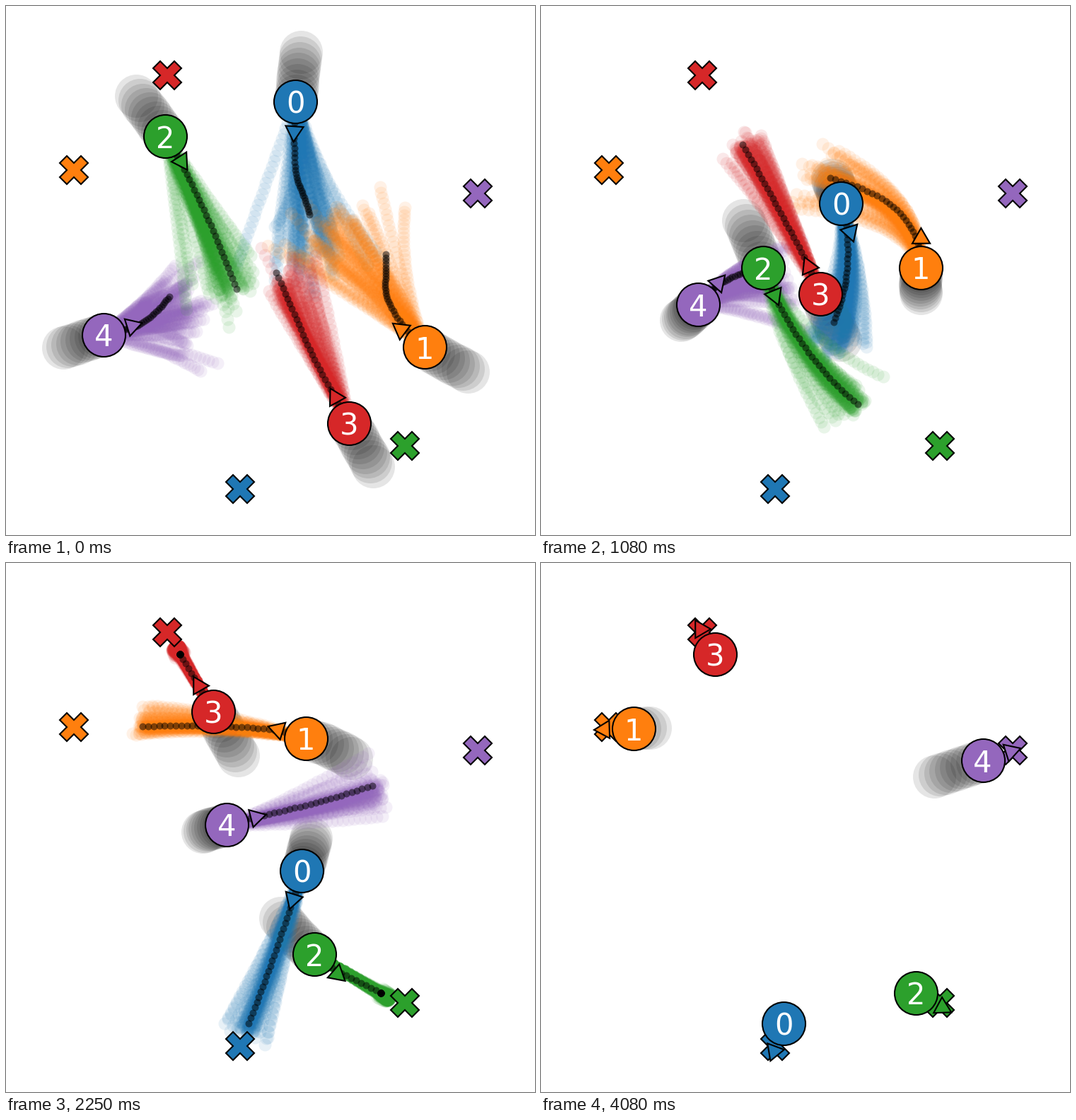
Animation of 748 by 748 pixels, one loop 4.12 s. Source, as a matplotlib script:

```python
import numpy as np
import matplotlib.pyplot as plt
from matplotlib.animation import FuncAnimation

SIZE, DPI = 748, 88
LOOP, TICK, STEPS = 4120, 20, 99
HORIZON, TRAIL, SAMPLES = 30, 9, 32
PX = 72 / DPI  # points per pixel
EDGE = 2.08

KEYS = [-9, 0, 14, 26, 30, 44, 56, 74]  # steps of the waypoints


class Path:
    """Hermite curve through waypoints that halts at the last one."""

    def __init__(self, points, arrival):
        self.t = np.array(KEYS[:len(points) - 1] + [arrival], float)
        self.p = np.array(points, float)
        self.v = np.gradient(self.p, self.t, axis=0)

    def __call__(self, step):
        s = np.clip(np.atleast_1d(step).astype(float), self.t[0], self.t[-1])
        i = np.clip(np.searchsorted(self.t, s) - 1, 0, len(self.t) - 2)
        h = (self.t[i + 1] - self.t[i])[:, None]
        u = (s - self.t[i])[:, None] / h
        a, b = self.p[i], self.p[i + 1]
        va, vb = self.v[i] * h, self.v[i + 1] * h
        return ((2 * u**3 - 3 * u**2 + 1) * a + (u**3 - 2 * u**2 + u) * va
                + (3 * u**2 - 2 * u**3) * b + (u**3 - u**2) * vb)

    def heading(self, step):
        s = min(step, self.t[-1] - 0.5)
        before, after = self([s - 0.4, s + 0.4])
        return (after - before) / np.hypot(*(after - before))


class Fan:
    """Sampled plans scattered around the real one, narrowing on arrival."""

    def __init__(self, path, offset, decay, spread, seed):
        rng = np.random.default_rng(seed)
        self.path, self.offset = path, np.array(offset)
        self.decay, self.spread = decay, spread
        self.phase = rng.uniform(0, 2 * np.pi, (3, SAMPLES, 3))
        self.freq = rng.uniform(0.04, 0.2, (3, SAMPLES, 3))

    def noise(self, step):
        """Slowly drifting, roughly normal values: three per sample."""
        z = np.sin(self.freq * step + self.phase).sum(-1) * (2 / 3) ** 0.5
        return (z * (0.75 + 0.15 * z**2))[..., None]

    def __call__(self, step):
        start, middle, goal = self.path(step + np.array([0, 0.5, 1]) * HORIZON)
        left = max(0, 1 - step / self.path.t[-1])
        spread = self.spread * left**1.4
        end = goal + self.offset * np.exp(-step / self.decay) * min(1, 2 * left)
        bulge = (2 * middle - start - goal) * (1 - np.exp(-step / 10))
        d = (end - start) / (np.hypot(*(end - start)) + 1e-6)
        n = np.array([-d[1], d[0]])
        side, along, mid = self.noise(step)
        ends = end + spread * (side * n + 0.5 * along * d)
        ctrl = (start + end) / 2 + bulge + n * spread * (0.4 * side + 0.25 * mid)
        u = np.linspace(0, 1, HORIZON + 1)[:, None, None]
        curve = (1 - u)**2 * start + 2 * u * (1 - u) * ctrl + u**2 * ends
        return curve.reshape(-1, 2)


fig = plt.figure(figsize=(SIZE / DPI, SIZE / DPI), dpi=DPI, facecolor="white")
ax = fig.add_axes([0, 0, 1, 1])
ax.set(xlim=(0, SIZE), ylim=(SIZE, 0))
ax.axis("off")


def markers(shape, size, color, z, alpha=None, edge=0):
    line, = ax.plot([], [], ls="", marker=shape, ms=size * PX, mfc=color,
                    mec="black", mew=edge * PX, alpha=alpha, zorder=z)
    return line


def place(line, points):
    points = np.atleast_2d(points)
    line.set_data(points[:, 0], points[:, 1])


class Agent:
    def __init__(self, name, color, layer, goal, arrival, points,
                 offset, decay, spread):
        self.path = Path(points, arrival)
        self.fan = Fan(self.path, offset, decay, spread, seed=layer)
        place(markers("X", 40, color, 3, edge=EDGE), goal)
        self.trail = markers("o", 61, "black", 1, alpha=0.1)
        self.cloud = markers("o", 18, color, 2 + layer / 10, alpha=0.1)
        self.plan = markers("o", 10, "black", 4, alpha=0.5)
        self.arrow = markers((3, 0, 0), 29, color, 5, edge=EDGE)
        self.body = markers("o", 61, color, 6, edge=EDGE)
        self.label = ax.text(0, 0, name, color="white", ha="center",
                             va="center_baseline", fontsize=41.67 * PX,
                             family="DejaVu Sans", zorder=7)

    def show(self, step):
        pos = self.path(step)[0]
        dx, dy = self.path.heading(step)
        last = min(step + HORIZON, STEPS)
        place(self.trail, self.path(np.arange(step - TRAIL, step)))
        place(self.plan, self.path(np.arange(step, last + 1)))
        place(self.cloud, self.fan(step))
        place(self.arrow, pos + 42 * np.array([dx, dy]))
        self.arrow.set_marker((3, 0, np.degrees(np.arctan2(-dy, dx)) - 90))
        place(self.body, pos)
        self.label.set_position(pos)


agents = [
    Agent("0", "tab:blue", 1, (331, 683), 84,
          [(417, 65), (409.5, 135), (409.5, 232), (424.5, 279), (429.5, 295),
           (431.5, 383), (414.5, 447), (371, 577), (343.5, 650.5)],
          (0, 58), 40, 38),
    Agent("1", "tab:orange", 2, (96, 231.5), 92,
          [(653, 517), (592, 482), (541, 418), (537, 369.5), (537, 351),
           (493, 279.5), (409, 243), (271, 230), (131, 234)],
          (-82, -39), 13, 40),
    Agent("2", "tab:green", 3, (564.5, 621.5), 68,
          [(184, 127), (225, 184), (276.5, 281), (314, 370), (326, 400),
           (383, 496), (448, 563), (530, 608)],
          (-15, 0), 20, 29),
    Agent("3", "tab:red", 4, (228.5, 98), 66,
          [(519, 651), (485.5, 590), (433, 493), (395, 406.5), (382, 377),
           (331.5, 279), (285, 196), (246, 129)],
          (12, 8), 20, 29),
    Agent("4", "tab:purple", 0, (667.5, 265), 99,
          [(81, 483), (138, 464.5), (189, 450), (222, 422), (231, 411),
           (274, 381.5), (322, 367), (445, 337), (632, 277)],
          (30, 24), 40, 42),
]


def update(frame):
    # Steps last a little over 41 ms, so each spans two or three ticks
    step = int((frame * TICK + 12) * STEPS / LOOP)
    for agent in agents:
        agent.show(step)
    return []


anim = FuncAnimation(fig, update, frames=LOOP // TICK, interval=TICK,
                     init_func=lambda: update(0), repeat=True, repeat_delay=0,
                     cache_frame_data=False)
plt.show()
```
